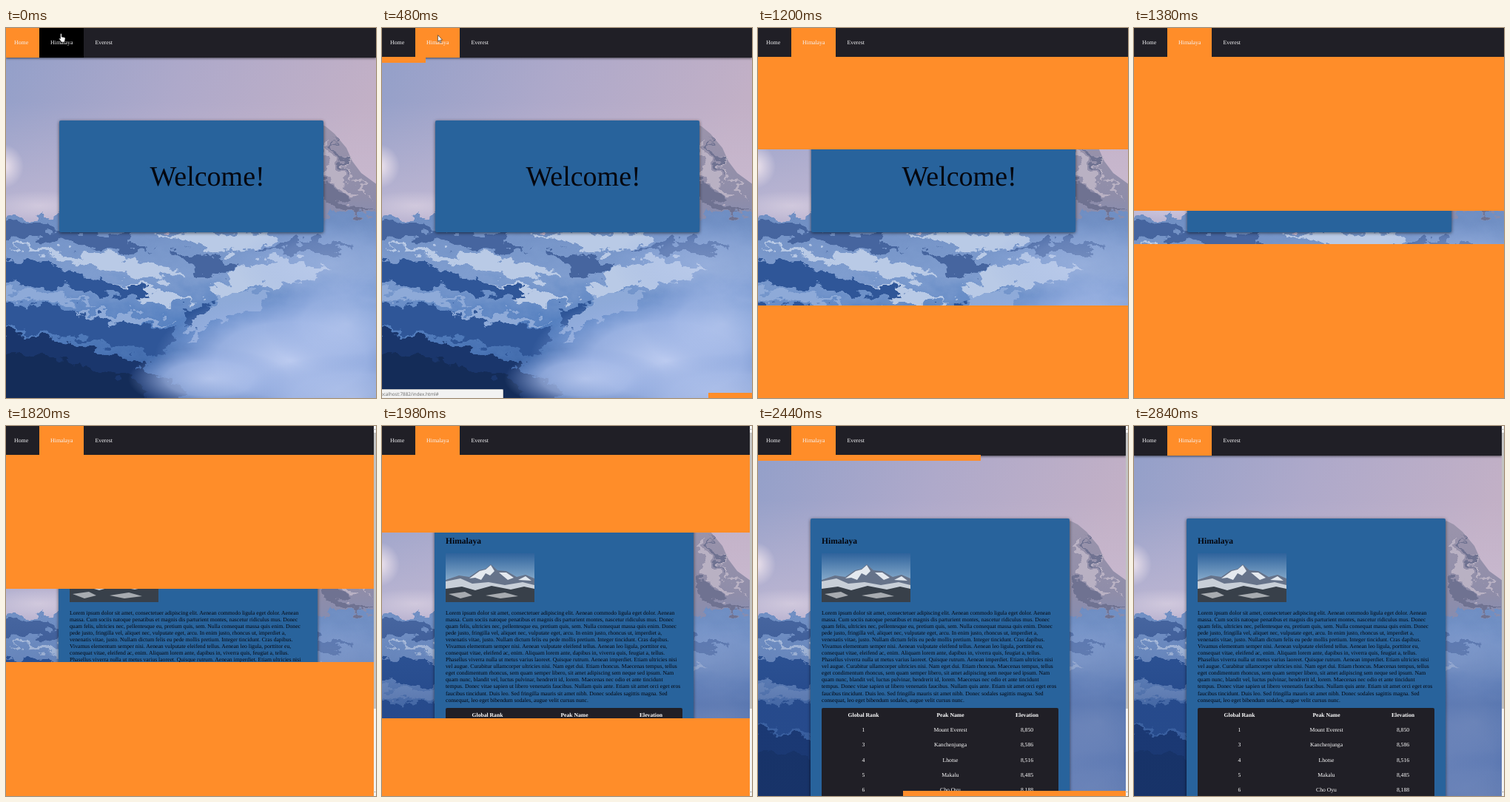
An HTML page that plays this animation: 500 by 500 pixels, repeating every 3000 ms.

```html
<!DOCTYPE html>
<html lang="en">
<head>
<meta charset="utf-8">
<title>Welcome</title>
<style>
  :root { --orange: #ff8d29; --dark: #201f26; --blue: #28639c; --loop: 3s linear infinite; }
  html, body { margin: 0; width: 100%; height: 100%; overflow: hidden; }
  body {
    position: relative;
    font: 7.65px "Liberation Serif", "Times New Roman", serif;
    text-rendering: geometricPrecision;
  }
  .stage { position: absolute; left: 0; top: 0; width: 500px; height: 500px; overflow: hidden; }
  .stage > *, .frame > * { position: absolute; }
  .scene { left: 0; top: 0; }

  /* Pages */
  .card {
    box-sizing: border-box;
    top: 125px;
    background: var(--blue);
    border-radius: 2px;
    box-shadow: 0 1px 4px rgba(0, 0, 0, .6);
    color: #05070f;
  }
  .welcome { left: 72px; width: 357px; height: 151px; animation: leave var(--loop); }
  .welcome span { position: absolute; left: 122.5px; top: 54px; font-size: 38px; line-height: 44px; }
  .article { left: 71px; width: 350px; height: 460px; }
  .article > * { position: absolute; left: 15px; margin: 0; }
  .second { animation: enter var(--loop); }
  .dusk { inset: 0; background: linear-gradient(transparent 52%, rgba(28, 60, 125, .45) 75%); }
  h1 { top: 24px; font-size: 11.5px; line-height: 14px; }
  .photo { top: 47px; }
  .lorem { top: 122.6px; line-height: 9.08px; white-space: pre; }
  table {
    top: 256px; width: 320px; table-layout: fixed; border-spacing: 0;
    background: var(--dark); color: #fff; border-radius: 2px; text-align: center;
  }
  th, td { height: 20.2px; padding: 0; line-height: 10px; }
  th:nth-child(1) { width: 113px; }
  th:nth-child(2) { width: 122px; }

  /* Navigation and shutters */
  .frame { left: 0; top: 0; width: 500px; height: 500px; animation: narrow var(--loop); }
  nav {
    left: 0; top: 0; width: 100%; height: 39.5px;
    display: flex;
    background: var(--dark);
    box-shadow: 0 1px 3px rgba(0, 0, 0, .6);
    color: #f4f4f6;
    font-size: 7.82px;
    line-height: 39.5px;
  }
  nav span { padding: 0 15px; }
  .home { margin-left: -4px; animation: home var(--loop); }
  .peak { animation: peak var(--loop); }
  .bar { background: var(--orange); animation: shutter var(--loop); }
  .bar.top { left: 0; top: 39px; }
  .bar.bottom { right: 0; bottom: 0; }

  /* Browser parts */
  .status {
    left: -1px; bottom: 0; width: 165px; height: 12px;
    box-sizing: border-box;
    border: solid #c4c4c4; border-width: 1px 1px 0 0;
    border-radius: 0 2px 0 0;
    background: #f2f2f2; color: #666;
    font: 6.3px/11px "Open Sans", sans-serif;
    white-space: nowrap;
    animation: status var(--loop);
  }
  .status span { margin-left: -1px; }
  .scroll { right: 0; top: 0; width: 3px; height: 500px; background: #f1f1f1; }
  .scroll i { position: absolute; left: 0; width: 3px; background: #c2c2c2; }
  .scroll i:nth-child(1) { top: 9px; height: 373px; }
  .scroll i:nth-child(2) { top: 4px; height: 1px; left: 1px; width: 1px; background: #777; }
  .scroll i:nth-child(3) { top: 494px; height: 1px; left: 1px; width: 1px; background: #777; }
  .hand { left: 71px; top: 7px; animation: hand var(--loop); }
  .arrow { left: 75px; top: 9px; animation: arrow var(--loop); }

  @keyframes shutter {
    0%, 13.95% { width: 0; height: 7.5px; }
    31.5% { width: 100%; height: 7.5px; }
    47.67%, 57.2% { width: 100%; height: 230.5px; }
    72.9% { width: 100%; height: 7.5px; }
    94.4%, 100% { width: 0; height: 7.5px; }
  }
  @keyframes leave { 0%, 54.6% { visibility: visible; } 54.61%, 100% { visibility: hidden; } }
  @keyframes enter { 0%, 54.6% { visibility: hidden; } 54.61%, 100% { visibility: visible; } }
  @keyframes narrow { 0%, 54.6% { width: 500px; } 54.61%, 100% { width: 497px; } }
  @keyframes home {
    0%, 13% { background: var(--orange); }
    14.2%, 100% { background: var(--dark); }
  }
  @keyframes peak {
    0%, 13% { background: #000; }
    14.2%, 100% { background: var(--orange); }
  }
  @keyframes status {
    0%, 1.5% { opacity: 0; }
    5%, 30.5% { opacity: 1; }
    32.7% { opacity: .78; }
    36%, 100% { opacity: 0; }
  }
  @keyframes hand { 0%, 13% { opacity: 1; } 13.01%, 100% { opacity: 0; } }
  @keyframes arrow {
    0%, 13% { opacity: 0; transform: none; }
    13.01%, 22% { opacity: 1; transform: none; }
    27% { opacity: 1; transform: translateY(-24px); }
    27.01%, 100% { opacity: 0; transform: translateY(-24px); }
  }
</style>
</head>
<body>
<div class="stage">
  <svg class="scene" width="500" height="500" viewBox="0 0 500 500">
    <defs>
      <linearGradient id="sky" x1="0" y1="0" x2="1" y2=".25">
        <stop offset="0" stop-color="#929fc9"/>
        <stop offset=".5" stop-color="#aea9ca"/>
        <stop offset="1" stop-color="#c2b0c6"/>
      </linearGradient>
      <linearGradient id="haze" x1="0" y1="0" x2="0" y2="1">
        <stop offset=".2" stop-color="#cfc2d8" stop-opacity="0"/>
        <stop offset=".5" stop-color="#cfc2d8" stop-opacity=".6"/>
      </linearGradient>
      <linearGradient id="rock" x1="0" y1="0" x2="0" y2="1">
        <stop offset="0" stop-color="#9b94ab"/>
        <stop offset=".55" stop-color="#8f8da9"/>
        <stop offset="1" stop-color="#7b8dba"/>
      </linearGradient>
      <linearGradient id="snow" x1="0" y1="0" x2="0" y2="1">
        <stop offset="0" stop-color="#6e8dc2"/>
        <stop offset=".3" stop-color="#7f9dcf"/>
        <stop offset=".55" stop-color="#5580c0"/>
        <stop offset="1" stop-color="#234a8c"/>
      </linearGradient>
      <radialGradient id="cloud">
        <stop offset="0" stop-color="#f1e6ee"/>
        <stop offset="1" stop-color="#f1e6ee" stop-opacity="0"/>
      </radialGradient>
      <radialGradient id="fog">
        <stop offset="0" stop-color="#bccbf0"/>
        <stop offset=".55" stop-color="#a9bdea" stop-opacity=".8"/>
        <stop offset="1" stop-color="#8fa9e0" stop-opacity="0"/>
      </radialGradient>
      <filter id="rugged" x="-10%" y="-10%" width="120%" height="120%" color-interpolation-filters="sRGB">
        <feTurbulence type="fractalNoise" baseFrequency=".045 .07" numOctaves="4" seed="7"/>
        <feDisplacementMap in="SourceGraphic" scale="34" xChannelSelector="R" yChannelSelector="G"/>
        <feGaussianBlur stdDeviation=".6"/>
      </filter>
    </defs>
    <path fill="url(#sky)" d="M0 0H500V300H0z"/>
    <path fill="url(#haze)" d="M0 0H500V500H0z"/>
    <ellipse cx="-4" cy="187" rx="28" ry="30" fill="url(#cloud)"/>
    <ellipse cx="45" cy="240" rx="75" ry="20" fill="url(#cloud)" opacity=".4"/>
    <path fill="url(#rock)" d="M270 300L340 225 390 170 422 128 432 133 444 143 460 162 468 180 480 196 502 212V310H270z"/>
    <g filter="url(#rugged)">
      <path fill="#b9b1c3" d="M430 150L442 176 456 204 474 232 462 230 444 212 430 190zM452 170L470 204 500 232 478 218 460 194z"/>
      <path fill="#6f7291" d="M430 200L448 222 476 246 500 250 470 254 444 240 430 226zM438 146L452 172 464 200 450 184z"/>
      <path fill="url(#snow)" d="M-30 262L16 256 50 257 90 248 170 272 300 270 400 262 440 250 530 262V530H-30z"/>
      <g fill="#46659f">
        <path d="M-20 268L40 262 70 274 130 276 200 300 160 304 100 292 30 282 -20 290z"/>
        <path d="M220 300L270 306 318 318 300 332 262 330z"/>
        <path d="M340 296L420 284 470 296 440 304 380 304z"/>
      </g>
      <g fill="#b9cae6">
        <path d="M200 276L310 280 372 276 340 298 290 304 250 290z"/>
        <path d="M60 310L140 304 210 322 250 336 200 340 130 326z"/>
        <path d="M310 326L380 310 440 326 400 342 340 348 290 372 270 362z"/>
        <path d="M0 292L50 296 100 310 60 308z"/>
        <path d="M120 342L200 350 250 366 220 374 160 362z"/>
      </g>
      <g fill="#2f5698">
        <path d="M-20 312L50 318 120 338 200 358 170 364 90 352 -20 342z"/>
        <path d="M244 374L282 376 270 396 238 404z"/>
        <path d="M-20 368L70 376 150 396 230 410 210 446 110 420 -20 404z"/>
      </g>
      <g fill="#8eaad8">
        <path d="M-20 350L60 358 130 374 80 372 0 364z"/>
        <path d="M90 384L170 384 226 402 170 400z"/>
        <path d="M290 366L360 352 340 376 280 398 240 422 250 404z"/>
      </g>
      <path fill="#1a366c" d="M-30 406L40 416 110 432 180 456 230 480 250 530H-30z"/>
      <path fill="#142c58" d="M-30 436L40 440 110 458 180 476 206 530H-30z"/>
    </g>
    <ellipse cx="440" cy="320" rx="130" ry="60" fill="url(#fog)" opacity=".4"/>
    <ellipse cx="385" cy="448" rx="185" ry="92" fill="url(#fog)"/>
    <ellipse cx="460" cy="400" rx="110" ry="70" fill="url(#fog)" opacity=".7"/>
    <ellipse cx="275" cy="474" rx="110" ry="42" fill="url(#fog)" opacity=".85"/>
    <ellipse cx="470" cy="500" rx="150" ry="60" fill="url(#fog)" opacity=".8"/>
  </svg>

  <div class="card welcome"><span>Welcome!</span></div>

  <div class="dusk second"></div>
  <div class="card article second">
    <h1>Himalaya</h1>
    <svg class="photo" width="120" height="66" viewBox="0 0 120 66">
      <defs>
        <linearGradient id="air" x1="0" y1="0" x2="0" y2="1">
          <stop offset="0" stop-color="#2f639c"/>
          <stop offset=".6" stop-color="#8db0cf"/>
        </linearGradient>
      </defs>
      <path fill="url(#air)" d="M0 0H120V66H0z"/>
      <path fill="#66738a" d="M0 36L18 30 32 32 45 23 54 21 61 15 70 23 82 24 96 32 108 29 120 34V66H0z"/>
      <path fill="#e4e9ef" d="M32 34L46 24 54 22 61 16 66 24 60 30 54 27 48 36 40 33zM72 26L82 26 92 33 84 36 78 31zM98 36L108 31 116 37z"/>
      <path fill="#c8cfd8" d="M0 38L20 34 36 41 58 39 80 43 104 39 120 43V50H0z"/>
      <path fill="#38404a" d="M0 48L22 45 40 50 62 44 88 49 106 45 120 48V66H0z"/>
      <path fill="#a7abb0" d="M4 55L26 52 36 57 20 61zM54 57L80 53 98 58 74 61z"/>
    </svg>
    <p class="lorem">Lorem ipsum dolor sit amet, consectetuer adipiscing elit. Aenean commodo ligula eget dolor. Aenean
massa. Cum sociis natoque penatibus et magnis dis parturient montes, nascetur ridiculus mus. Donec
quam felis, ultricies nec, pellentesque eu, pretium quis, sem. Nulla consequat massa quis enim. Donec
pede justo, fringilla vel, aliquet nec, vulputate eget, arcu. In enim justo, rhoncus ut, imperdiet a,
venenatis vitae, justo. Nullam dictum felis eu pede mollis pretium. Integer tincidunt. Cras dapibus.
Vivamus elementum semper nisi. Aenean vulputate eleifend tellus. Aenean leo ligula, porttitor eu,
consequat vitae, eleifend ac, enim. Aliquam lorem ante, dapibus in, viverra quis, feugiat a, tellus.
Phasellus viverra nulla ut metus varius laoreet. Quisque rutrum. Aenean imperdiet. Etiam ultricies nisi
vel augue. Curabitur ullamcorper ultricies nisi. Nam eget dui. Etiam rhoncus. Maecenas tempus, tellus
eget condimentum rhoncus, sem quam semper libero, sit amet adipiscing sem neque sed ipsum. Nam
quam nunc, blandit vel, luctus pulvinar, hendrerit id, lorem. Maecenas nec odio et ante tincidunt
tempus. Donec vitae sapien ut libero venenatis faucibus. Nullam quis ante. Etiam sit amet orci eget eros
faucibus tincidunt. Duis leo. Sed fringilla mauris sit amet nibh. Donec sodales sagittis magna. Sed
consequat, leo eget bibendum sodales, augue velit cursus nunc.</p>
    <table>
      <tr><th>Global Rank</th><th>Peak Name</th><th>Elevation</th></tr>
      <tr><td>1</td><td>Mount Everest</td><td>8,850</td></tr>
      <tr><td>3</td><td>Kanchenjunga</td><td>8,586</td></tr>
      <tr><td>4</td><td>Lhotse</td><td>8,516</td></tr>
      <tr><td>5</td><td>Makalu</td><td>8,485</td></tr>
      <tr><td>6</td><td>Cho Oyu</td><td>8,188</td></tr>
    </table>
  </div>

  <div class="frame">
    <nav><span class="home">Home</span><span class="peak">Himalaya</span><span>Everest</span></nav>
    <div class="bar top"></div>
    <div class="bar bottom"></div>
  </div>

  <div class="status"><span>ocalhost:7882/index.html#</span></div>
  <div class="scroll second"><i></i><i></i><i></i></div>
  <svg class="hand" width="10" height="13" viewBox="0 0 10 13">
    <path fill="#fff" stroke="#222" stroke-width=".5" d="M2.6 1.2Q3.4 0 4.2 1.2V5L8 5.8Q9.2 6 9 7.5L8 12H4L.6 7.6Q.8 6.6 2.6 7.6z"/>
  </svg>
  <svg class="arrow" width="8" height="13" viewBox="0 0 8 13">
    <path fill="#fff" stroke="#222" stroke-width=".6" d="M.5.6V9.4L2.5 7.6 3.9 11 5.2 10.4 3.8 7.2H6.6z"/>
  </svg>
</div>
</body>
</html>
```
